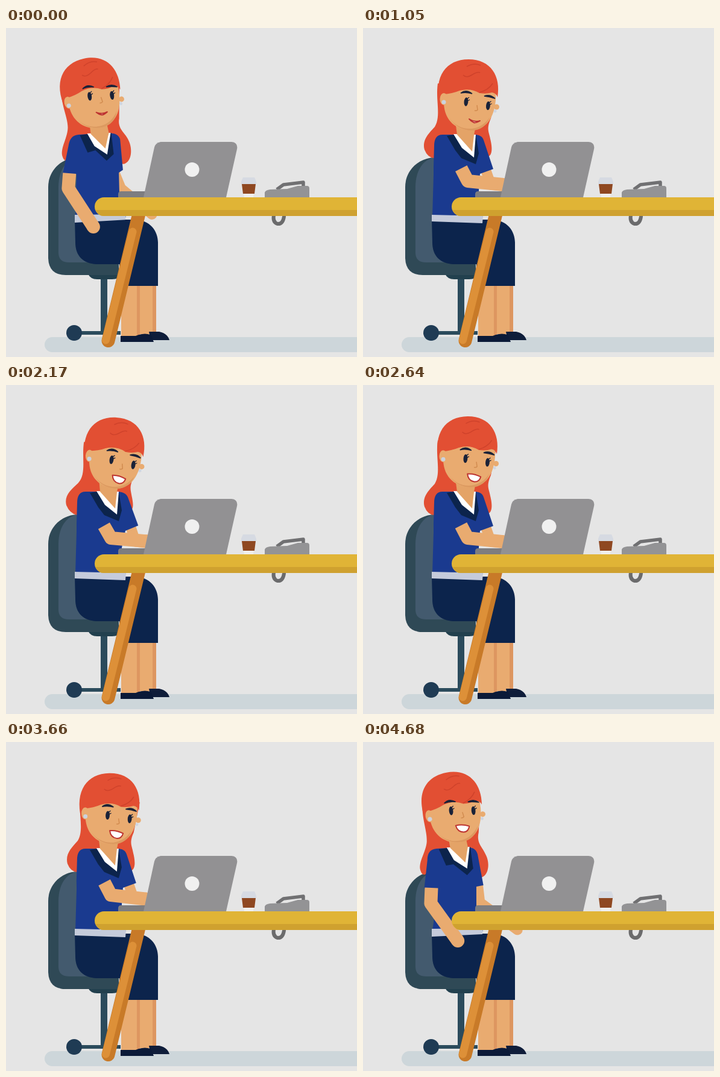
An HTML page for the animation above (4.74 s loop, 582 px wide and 546 px high).

```html
<!DOCTYPE html>
<html lang="en">
<head>
<meta charset="utf-8">
<title>Woman at a desk</title>
<style>
  html, body { margin: 0; width: 100%; height: 100%; overflow: hidden; background: #e5e5e5; }
  svg { display: block; width: 582px; height: 546px; }
  .line { fill: none; stroke-linejoin: round; }
  .skin { fill: #e9ab70; }
  .arm { stroke: #e9ab70; }
  .hair { fill: #e24f33; }
  .navy { fill: #0c244c; }
  .ink { fill: #1a2238; }
</style>
</head>
<body>
<svg viewBox="0 0 582 546">
  <rect width="582" height="546" fill="#e5e5e5"/>
  <rect x="64" y="513" width="560" height="25" rx="12.5" fill="#cdd6da"/>

  <g id="chair">
    <path d="M112 506H190" class="line" stroke="#2b4b5c" stroke-width="6"/>
    <rect x="157" y="412" width="11" height="93" fill="#2b4b5c"/>
    <circle cx="113" cy="506" r="13" fill="#1f3b54"/>
    <path d="M136 408H190Q188 417 176 417H151Q140 417 136 408Z" fill="#22404e"/>
    <path d="M128 215H118C90 216 70 238 70 264V382Q71 410 99 410H187V380H128Z" fill="#2f4956"/>
    <path d="M128 215H118C97 219 87 240 87 264V374Q88 389 104 389H150V215Z" fill="#435a6e"/>
  </g>

  <path id="backHair" class="hair"/>
  <path id="farArm" class="line arm" stroke-width="17" stroke-linecap="round"/>

  <g id="legs">
    <rect x="222" y="425" width="27" height="83" class="skin"/>
    <rect x="243" y="425" width="6" height="83" fill="#dd9660"/>
    <rect x="191" y="425" width="31" height="87" class="skin"/>
    <rect x="217" y="425" width="5" height="87" fill="#dd9660"/>
    <path d="M237 504H254Q268 507 271 518H240Z" fill="#0f1d3a"/>
    <path d="M190 511H215Q228 505 240 509L245 521H190Z" fill="#0b1a38"/>
  </g>
  <path d="M114 318H212C240 318 252 338 252 356V428H188V392H150C128 391 115 378 115 356Z" class="navy"/>

  <path id="torso" fill="#1a3a8f"/>
  <path id="belt" fill="#c5cbdb"/>
  <path id="collar" class="navy"/>
  <path id="blouse" fill="#fff"/>
  <path id="neck" fill="#e4a367"/>
  <path id="nearArm" class="line arm" stroke-width="22"/>
  <circle id="hand" r="11" class="skin"/>

  <g id="head">
    <circle cx="221.500" cy="131" r="4.5" class="skin"/>
    <circle cx="219" cy="138" r="2.5" fill="#cfd6e2"/>
    <path d="M133 95L134 125C135 154 155 170 180 170C204 168 217 150 220 120L221 95Z" class="skin"/>
    <path d="M143 149C152 162 165 168 180 167C192 166 203 159 210 148C205 162 195 170 180 170C164 170 151 162 143 149Z" fill="#dc9a60"/>
    <path d="M127 126C117 80 138 52 175 52C212 52 229 80 223 115Q221 108 214 107Q204 110 193 108Q178 99 160 104Q148 109 133 110Z" class="hair"/>
    <path d="M166 78Q171 84 182 77Q190 72 194 74M172 64Q184 57 195 62M193 107Q208 103 215 92" class="line" stroke="#cf422b" stroke-width="1.5"/>
    <ellipse cx="134" cy="118" rx="6.500" ry="10" class="skin"/>
    <circle cx="134" cy="123" r="3.5" fill="#cbd3df"/>
    <g id="face">
      <path d="M162 108Q171 101 181 109Q171 106 162 108ZM201 113Q211 109 219 117Q210 114 201 113Z" class="ink" stroke="#1a2238" stroke-width="1.5"/>
      <g id="eye">
        <ellipse cx="171" cy="122.5" rx="3.4" ry="7.2" class="ink" transform="rotate(5 171 122)"/>
        <path d="M172 118L176 115M173 121L177 119" class="line" stroke="#1a2238" stroke-width="1.3"/>
      </g>
      <use href="#eye" x="36.500" y="6.5"/>
      <path d="M189 128L190 136Q188 138 185 137" class="line" stroke="#d18b4f" stroke-width="1.5"/>
      <path id="mouth" fill="#fff" stroke="#bd3330" stroke-width="2" stroke-linejoin="round"/>
    </g>
  </g>

  <g id="desk" stroke-linecap="round">
    <path d="M221 306L169.500 519" class="line" stroke="#c87a28" stroke-width="22"/>
    <path d="M210 338L165.500 518" class="line" stroke="#dd9038" stroke-width="13"/>
    <path d="M444 311Q442 322 450 325Q459 326 461 313" class="line" stroke="#6b6b6c" stroke-width="6"/>
    <path d="M591 281H162.500a15.500 15.500 0 0 0 0 31H591Z" fill="#e0b436"/>
    <path d="M591 302H148.500Q153 312 162.500 312H591Z" fill="#cfa12f"/>
  </g>

  <g id="laptop">
    <path d="M232 271H191Q186 271 186 276V281H232Z" fill="#7d7d80"/>
    <path d="M257 189H374Q385 190 383 201L365 281H228L246 198Q248 190 257 189Z" fill="#929193"/>
    <circle cx="308.500" cy="235" r="12" fill="#f0f0f0"/>
  </g>

  <g id="cup">
    <path d="M392 258H413L410 281H395Z" fill="#f0efed"/>
    <path d="M391 259H414L412 275H393Z" fill="#8f4821"/>
    <path d="M393 248H412L415 255V259H390V255Z" fill="#d6dae2"/>
  </g>

  <g id="phone">
    <path d="M449 268L460 260L493 256V262" class="line" stroke="#707072" stroke-width="5.500"/>
    <path d="M429 281V273Q430 269 438 268L466 267L484 262H499Q503 262 503 266V281Z" fill="#939395"/>
  </g>
</svg>

<script>
const LOOP = 4740;
const el = id => document.getElementById(id);
const lerp = (a, b, k) => a + (b - a) * k;
const ease = k => (1 - Math.cos(Math.PI * k)) / 2;

// Head shift in px over time; the backward swing runs across the loop seam.
const leanKeys = [[190, -42], [250, -42], [800, -0.5], [1050, 0], [1400, 0], [1760, 6], [1900, 6],
  [2640, -1], [3240, -3.5], [4130, -1], [4400, -1], [4930, -42]];

// Head shifts at which the poses below hold: upright, half turned, typing, bent forward.
const stops = [-31.5, -23, 0, 6];
const tilt = [-12.5, -10.5, 0, 5];
const drop = [-3.5, -3, 0, 3];
const look = [-7.5, -6.5, 0, 0];

const poses = {
  backHair: [
    'M92 92C86 120 102 146 102 165C102 182 90 198 93 212Q97 226 106 216L195 226C209 222 210 200 203 186C198 174 184 168 187 150L187 90Z',
    'M100 92C95 120 107 146 106 165C105 182 92 198 95 212Q99 226 108 216L196 225C209 221 211 200 203 186C198 174 188 168 192 150L195 90Z',
    'M124 92C120 120 130 146 119 164C108 176 98 186 102 202Q107 215 118 216L206 214C216 212 214 196 211 184C209 172 204 168 212 150L222 100Z',
    'M132 96C128 122 136 148 120 162C108 172 95 182 99 198Q105 212 118 216L205 206C211 205 209 194 207 184C206 176 203 170 213 152L229 104Z'
  ],
  torso: [
    'M120 177C108 178 105 186 103 196L93 242L116 243L115 314L199 314L188 275L187 240L193 235L189 184C186 176 180 175 170 174Z',
    'M122 177C110 178 107 186 107 196L102 243L125 244L115 314L199 314L188 275L188 240L200 238L190 186C187 177 182 176 174 174Z',
    'M132 177C122 177 118 184 118 196L117 230L117 244L115 314L199 314L192 270L194 242L216 234L200 186C198 180 194 178 187 177Z',
    'M132 177C122 177 118 184 118 196L117 230L117 244L115 314L199 314L192 270L200 242L221 233L203 186C200 180 194 178 187 177Z'
  ],
  belt: [
    'M114 310L199 309L198 318L114 323Z',
    'M114 310L199 309L198 319L114 323Z',
    'M114 310L199 312L198 324L114 321Z',
    'M114 310L199 312L198 324L114 321Z'
  ],
  collar: [
    'M122 178L135 207L148 203L166 220L178 209L174 174L135 176Z',
    'M126 178L138 205L150 203L173 221L183 210L178 174L140 176Z',
    'M139 179L153 203L163 216L187 226L192 208L187 177L151 177Z',
    'M139 179L153 203L163 216L187 226L192 208L187 177L151 177Z'
  ],
  blouse: [
    'M134 175L146 196L167 210L173 174Z',
    'M139 175L151 196L173 210L177 174Z',
    'M150 176L164 199L184 215L187 177Z',
    'M150 176L164 199L184 215L187 177Z'
  ],
  neck: [
    'M138 160L140 176L164 200L170 174L167 160Z',
    'M142 160L145 176L170 200L174 174L171 160Z',
    'M154 162L156 177L181 205L184 178L187 162Z',
    'M155 162L156 177L181 205L184 178L187 162Z'
  ],
  farArm: [
    'M178 240L190 266L240 309', 'M191 236L194 266L257 312',
    'M204 237L212 260L240 263', 'M209 237L216 260L240 263'
  ],
  nearArm: [
    'M104 241L102 266L143 330', 'M114 242L113 268L158 330',
    'M163 233L174 254L233 260', 'M161 234L173 254L233 259'
  ]
};
const mouths = [
  'M176 151Q186 157 194 154Q187 158 184 157Q179 155 176 151Z',
  'M174 148Q185 147 196 153Q193 162 185 161Q175 159 174 148Z'
];

// Blends the numbers of two paths of the same build.
function blend(a, b, k) {
  const target = b.match(/[\d.]+/g);
  let i = 0;
  return a.replace(/[\d.]+/g, n => lerp(+n, +target[i++], k).toFixed(2));
}

function track(keys, t) {
  let i = 1;
  while (i < keys.length - 1 && t > keys[i][0]) i++;
  const [t0, a] = keys[i - 1], [t1, b] = keys[i];
  return lerp(a, b, ease((t - t0) / (t1 - t0)));
}

function draw(t) {
  const lean = track(leanKeys, t < leanKeys[0][0] ? t + LOOP : t);
  const i = lean < stops[1] ? 0 : lean < stops[2] ? 1 : 2;
  const k = (lean - stops[i]) / (stops[i + 1] - stops[i]);
  const at = list => lerp(list[i], list[i + 1], k);

  // The body stays in the typing pose until the head has clearly moved away.
  const body = i === 1 ? 1 - (1 - k) ** 2 : k;
  for (const id in poses) el(id).setAttribute('d', blend(poses[id][i], poses[id][i + 1], body));

  const typing = lean > -6 ? Math.sin(t / LOOP * 2 * Math.PI * 16) : 0;
  el('nearArm').setAttribute('transform', `translate(${typing * 0.8} 0)`);
  const [x, y] = el('nearArm').getAttribute('d').match(/[\d.]+/g).slice(-2);
  el('hand').setAttribute('cx', x);
  el('hand').setAttribute('cy', y);

  el('head').setAttribute('transform', `translate(${lean} ${at(drop)}) rotate(${at(tilt)} 177.5 124.5)`);
  el('face').setAttribute('transform', `translate(0 ${at(look)})`);

  const open = Math.min(1, Math.max(0, (t - 1450) / 140));
  el('mouth').setAttribute('d', blend(mouths[0], mouths[1], open));
}

function tick() {
  draw(performance.now() % LOOP);
  requestAnimationFrame(tick);
}
tick();
</script>
</body>
</html>
```
